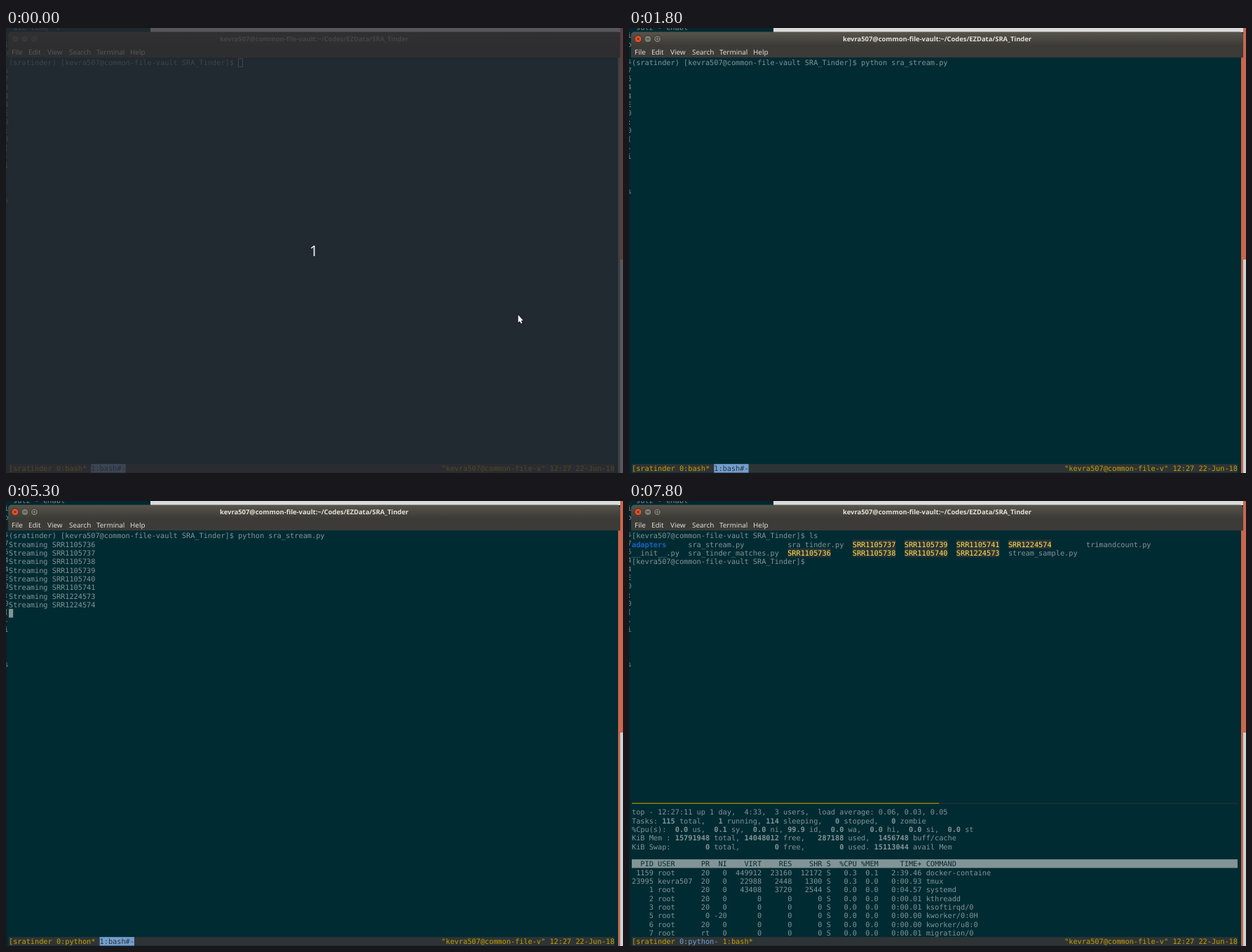
These frames come from a looping animation (880x636 px, 8 s). An HTML page with a canvas:

```html
<!DOCTYPE html>
<html lang="en">
<head>
<meta charset="utf-8">
<title>Terminal session</title>
<style>
  html, body { margin: 0; width: 100%; height: 100%; overflow: hidden; background: #012b32; }
  canvas { display: block; width: 100vw; height: 100vh; }
</style>
</head>
<body>
<canvas id="stage" width="880" height="636"></canvas>
<script>
const ctx = document.getElementById('stage').getContext('2d');
const LOOP = 8000;
const X0 = 4, Y0 = 43.2, CW = 6.171, CH = 12.34;
const MONO = '10.25px "DejaVu Sans Mono", monospace';
const SANS = '"Noto Sans", "Open Sans", sans-serif';
const BG = '#012b32', FG = '#839496', BLACK = '#2e3436',
      YELLOW = '#c4a000', BLUE = '#729fcf', BRIGHT = '#fce94f';

const USER = 'kevra507', HOST = 'common-file-vault';
const PROMPT = `[${USER}@${HOST} SRA_Tinder]$ `;
const ENV_PROMPT = '(sratinder) ' + PROMPT;
const RUNS = [1105736, 1105737, 1105738, 1105739, 1105740, 1105741, 1224573, 1224574];

const colX = c => X0 + c * CW;
const rowY = r => Y0 + r * CH;
const within = (t, a, b) => t >= a && t < b;

function rect(x, y, w, h, color) {
  ctx.fillStyle = color;
  ctx.fillRect(x, y, w, h);
}

function label(str, x, y, font, color, align = 'left') {
  ctx.font = font;
  ctx.fillStyle = color;
  ctx.textAlign = align;
  ctx.fillText(str, x, y);
}

// Writes word by word on the character grid.
function print(str, row, col = 0, color = FG, bold = () => false) {
  for (const m of str.matchAll(/\S+/g)) {
    const font = (bold(m[0]) ? 'bold ' : '') + MONO;
    label(m[0], colX(col + m.index), rowY(row) + 10.2, font, color);
  }
}

function cells(row, col, n, color) {
  rect(colX(col), rowY(row), n * CW, CH, color);
}

function printOn(str, row, col, color, back, bold) {
  cells(row, col, str.length, back);
  print(str, row, col, color, bold);
}

// Strip of the windows lying behind.
function backdrop(dimmed, focus) {
  rect(0, 0, 880, 636, '#02272e');
  rect(206, 0, 670, 6, focus ? '#d8dcdc' : '#e6e7e7');
  rect(876, 0, 4, 331, focus ? '#cb6650' : '#e07e6c');
  rect(876, 331, 4, 305, focus ? '#cbd3d6' : '#e9eaeb');
  const shift = dimmed ? CH : 0;
  [...'io s7544E0:0(-i   s'].forEach((ch, i) =>
    label(ch, 3.6, 14.4 + i * CH + shift, MONO, '#75878a', 'right'));
  label(dimmed ? 'sic timq  c' : 'sulz - enabl', 10, 2.6, MONO, '#75878a');
}

function button(x, fill, mark, kind) {
  ctx.beginPath();
  ctx.arc(x, 15.7, 5, 0, 7);
  ctx.fillStyle = fill;
  ctx.fill();
  ctx.strokeStyle = '#2b2a26';
  ctx.lineWidth = 0.8;
  ctx.stroke();
  ctx.strokeStyle = mark;
  ctx.lineWidth = 1;
  ctx.beginPath();
  if (kind === 'close') {
    ctx.moveTo(x - 1.8, 13.9); ctx.lineTo(x + 1.8, 17.5);
    ctx.moveTo(x + 1.8, 13.9); ctx.lineTo(x - 1.8, 17.5);
  } else if (kind === 'min') {
    ctx.moveTo(x - 2.2, 15.7); ctx.lineTo(x + 2.2, 15.7);
  } else {
    ctx.rect(x - 2, 13.7, 4, 4);
  }
  ctx.stroke();
}

function chrome(focus) {
  const g = ctx.createLinearGradient(0, 5, 0, 25);
  g.addColorStop(0, focus ? '#57554c' : '#45443f');
  g.addColorStop(1, '#3c3b37');
  ctx.fillStyle = g;
  ctx.beginPath();
  ctx.roundRect(3, 5.5, 873, 37, [5, 5, 0, 0]);
  ctx.fill();
  rect(3, 42.3, 870, 594, BG);
  rect(873, 42.3, 3, 594, focus ? '#c9674c' : '#7f8a8a');
  const gray = focus ? '#7d7a70' : '#66645c';
  button(13, focus ? '#e2542d' : gray, focus ? '#5a1c0c' : '#3c3b37', 'close');
  button(27, gray, '#3c3b37', 'min');
  button(40.5, gray, '#3c3b37', 'max');
  label(`${USER}@${HOST}:~/Codes/EZData/SRA_Tinder`, 439.5, 19, 'bold 9.4px ' + SANS,
    focus ? '#e6e1d6' : '#97948a', 'center');
  [['File', 8], ['Edit', 32], ['View', 59], ['Search', 90], ['Terminal', 129], ['Help', 177]]
    .forEach(([name, x]) => label(name, x, 38.3, '9.9px ' + SANS, '#dfdbd2'));
}

function statusBar(t) {
  const row = 47;
  cells(row, 0, 140, BLACK);
  print('[sratinder', row, 0, YELLOW);
  if (t < 6000) {
    const job = t < 2600 ? '0:bash*' : '0:python*';
    print(job, row, 11, YELLOW);
    printOn('1:bash#-', row, 12 + job.length, BLACK, BLUE);
  } else {
    print('0:python-', row, 11, BLUE);
    print('1:bash*', row, 21, YELLOW);
  }
  print(`"${USER}@${HOST.slice(0, 13)}" 12:27 22-Jun-18`, row, 100, YELLOW);
}

function cursor(row, col, focus = true) {
  if (focus) return cells(row, col, 1, FG);
  ctx.strokeStyle = FG;
  ctx.lineWidth = 1;
  ctx.strokeRect(Math.round(colX(col)) + 0.5, Math.round(rowY(row)) + 0.5, 6, 12);
}

function streamWindow(t, focus) {
  const cmd = t < 1200 ? '' : t < 1300 ? 'python ' : 'python sra_stream.py ';
  print(ENV_PROMPT + cmd, 0);
  if (t < 2300) {
    if (!within(t, 1800, 2100)) cursor(0, ENV_PROMPT.length + cmd.length, focus);
    return;
  }
  RUNS.forEach((id, i) => print('Streaming SRR' + id, i + 1));
  const off = [[3000, 3300], [3700, 4100], [4400, 4700], [5000, 5300]];
  if (!off.some(([a, b]) => within(t, a, b))) cursor(9, 0);
}

function proc(pid, cmd, time, o = {}) {
  const { user = 'root', pr = 20, ni = 0, virt = 0, res = 0, shr = 0, cpu = '0.0', mem = '0.0' } = o;
  const p = (v, n) => String(v).padStart(n);
  return p(pid, 5) + ' ' + user.padEnd(8) + p(pr, 4) + p(ni, 4) + p(virt, 8) + p(res, 7) +
    p(shr, 7) + ' S' + p(cpu, 6) + p(mem, 5) + p(time, 10) + ' ' + cmd;
}

const IDLE = [
  proc(1, 'systemd', '0:04.57', { virt: 43408, res: 3720, shr: 2544 }),
  proc(2, 'kthreadd', '0:00.01'),
  proc(3, 'ksoftirqd/0', '0:00.01'),
  proc(5, 'kworker/0:0H', '0:00.00', { pr: 0, ni: -20 }),
  proc(6, 'kworker/u8:0', '0:00.00'),
  proc(7, 'migration/0', '0:00.01', { pr: 'rt' }),
  proc(8, 'rcu_bh', '0:00.00')
];
const BUSY = [
  proc(25182, 'python', '0:00.09', { user: USER, virt: 344224, res: 16120, shr: 4672, cpu: '3.0', mem: '0.1' })
];
const LATER = [
  proc(1159, 'docker-containe', '2:39.46', { virt: 449912, res: 23160, shr: 12172, cpu: '0.3', mem: '0.1' }),
  proc(23995, 'tmux', '0:00.93', { user: USER, virt: 22988, res: 2448, shr: 1300, cpu: '0.3' })
];

function topPane(t) {
  const late = t >= 6900;
  rect(colX(0), 431.6, 71 * CW, 1.1, YELLOW);
  rect(colX(71), 431.6, 69 * CW, 1.1, BLACK);
  print(`top - 12:27:${late ? '11' : '08'} up 1 day,  4:33,  3 users,  load average: 0.06, 0.03, 0.05`, 32);
  [
    'Tasks: 115 total,   1 running, 114 sleeping,   0 stopped,   0 zombie',
    `%Cpu(s):  ${late ? '0.0' : '0.7'} us,  0.1 sy,  0.0 ni, ${late ? '99.9' : '99.2'} id,  0.0 wa,  0.0 hi,  0.0 si,  0.0 st`,
    'KiB Mem : 15791948 total, 14048012 free,   287188 used,  1456748 buff/cache',
    'KiB Swap:        0 total,        0 free,        0 used. 15113044 avail Mem'
  ].forEach((line, i) => print(line, 33 + i, 0, FG, w => /^[\d.]+$/.test(w)));
  cells(38, 0, 140, FG);
  print('  PID USER      PR  NI    VIRT    RES    SHR S  %CPU %MEM     TIME+ COMMAND', 38, 0, BG);
  [...(late ? LATER : BUSY), ...IDLE].slice(0, 8).forEach((line, i) => print(line, 39 + i));
}

function listing() {
  print('adapters', 1, 0, '#1f62c4', () => true);
  print('sra_stream.py', 1, 13);
  print('sra_tinder.py', 1, 36);
  print('trimandcount.py', 1, 105);
  print('__init__.py', 2, 0);
  print('sra_tinder_matches.py', 2, 13);
  print('stream_sample.py', 2, 87);
  const cols = [36, 51, 63, 75, 87];
  RUNS.forEach((id, i) => {
    const row = i % 2 ? 1 : 2;
    printOn('SRR' + id, row, cols[(i + 1) >> 1], BRIGHT, BLACK);
  });
}

function splitWindow(t) {
  const cmd = t < 6800 ? '' : t < 7300 ? 'l' : 'ls';
  print(PROMPT + cmd, 0);
  if (t < 7500) {
    cursor(0, PROMPT.length + cmd.length);
  } else {
    listing();
    print(PROMPT, 3);
    if (t < 7800) cursor(3, PROMPT.length);
  }
  topPane(t);
}

// Pointer stops: time, x, y; it is hidden while typing.
const STOPS = [
  [500, 731, 411], [1200],
  [3600, 731, 411], [3700, 706, 384], [3800, 640, 312], [3900, 552, 226], [4000, 461, 162], [4100, 300, 119],
  [4300, 210, 92], [4400, 140, 72], [4500, 130, 104], [4600, 122, 146], [4700, 112, 172],
  [4900, 108, 78], [5000, 112, 132], [5100, 116, 179], [5300],
  [6100, 220, 156], [6200, 296, 145], [6400, 298, 145], [6800]
];

function pointer(t) {
  const stop = STOPS.filter(s => s[0] <= t).pop();
  if (!stop || stop.length < 3) return;
  const [, x, y] = stop;
  rect(x, y - 4, 1, 9, '#e4e6e6');
  for (const dy of [-5, 5]) {
    rect(x - 2, y + dy, 2, 1, '#c8cdcd');
    rect(x + 1, y + dy, 2, 1, '#c8cdcd');
  }
}

function arrow(x, y) {
  ctx.beginPath();
  [[0, 0], [0, 11], [2.4, 8.9], [4, 12.6], [5.8, 11.8], [4.2, 8.2], [7.2, 8]]
    .forEach(([dx, dy]) => ctx.lineTo(x + dx, y + dy));
  ctx.closePath();
  ctx.fillStyle = '#fff';
  ctx.strokeStyle = '#0c0f10';
  ctx.lineWidth = 1.4;
  ctx.stroke();
  ctx.fill();
}

function countdown() {
  rect(0, 0, 880, 636, 'rgba(43, 43, 48, 0.76)');
  label('1', 439, 326, '21px ' + SANS, '#e9ebeb', 'center');
  arrow(730.5, 410);
}

function draw(t) {
  const dimmed = t < 500, focus = t >= 700;
  backdrop(dimmed, focus);
  chrome(focus);
  if (t < 6000) streamWindow(t, focus);
  else splitWindow(t);
  statusBar(t);
  if (dimmed) countdown();
  else pointer(t);
}

ctx.textRendering = 'geometricPrecision';
const start = performance.now();
function tick() {
  draw((performance.now() - start) % LOOP);
  requestAnimationFrame(tick);
}
tick();
</script>
</body>
</html>
```
